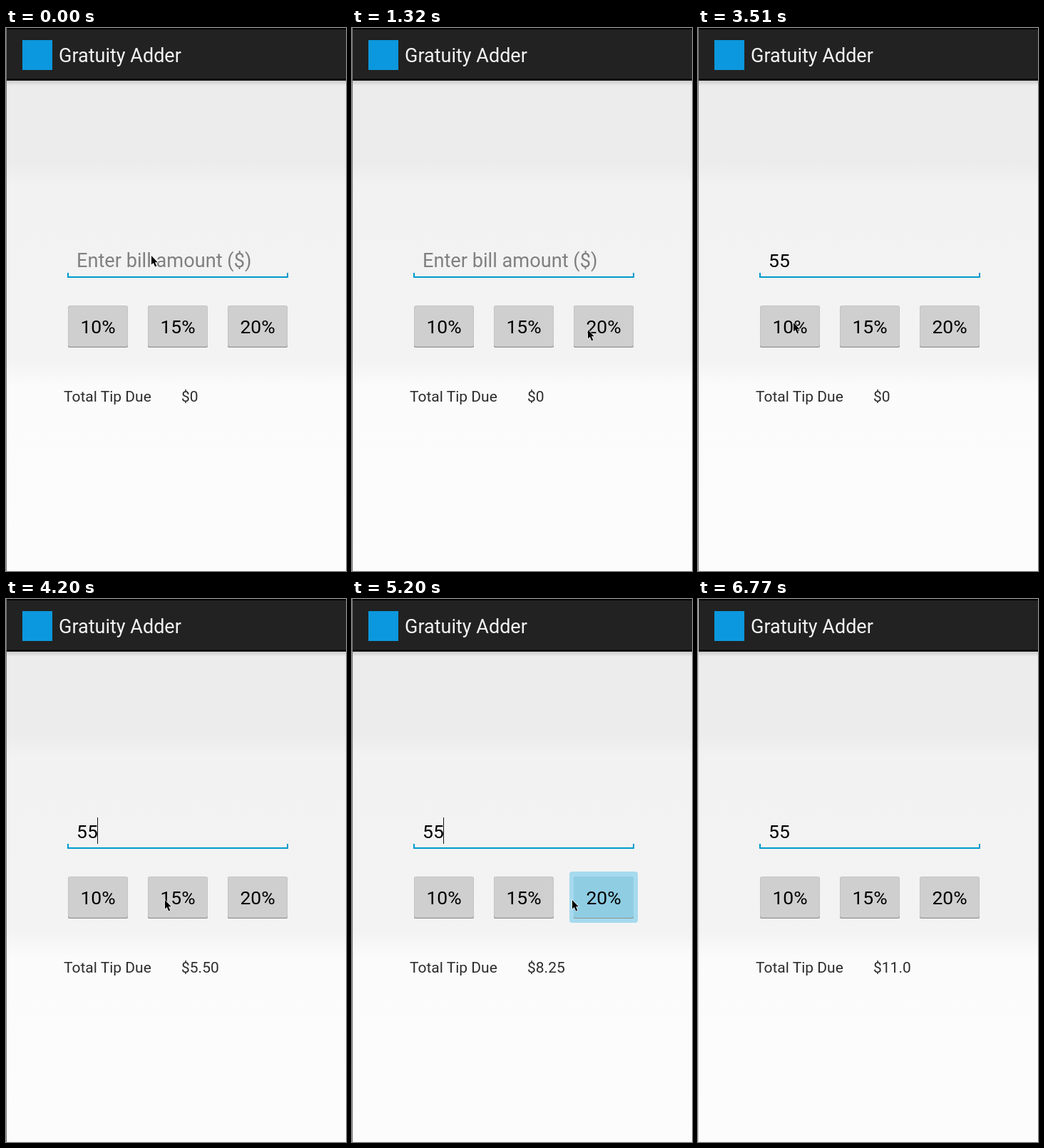
An HTML page that plays this animation: 477x763 px, repeating every 6790 ms.

```html
<!DOCTYPE html>
<html lang="en">
<head>
<meta charset="utf-8">
<title>Gratuity Adder</title>
<style>
  html, body { margin: 0; width: 100%; height: 100%; overflow: hidden; }
  svg { display: block; width: 477px; height: 763px; font: 27px Roboto, sans-serif; }
  .small { font-size: 21px; fill: #2c2c2c; }
  .hint { font-size: 27.2px; fill: #808080; }
  .value, #buttons { font-size: 26.5px; fill: #000; }
  .glow { fill: #33b5e5; opacity: .4; visibility: hidden; }
  .face { fill: #cfcfcf; stroke: #c4c4c4; }
  .down .glow { visibility: visible; }
  .down .face { fill: #8fcde3; stroke: #8fcde3; }
</style>
</head>
<body>
<svg viewBox="0 0 477 763">
  <defs>
    <linearGradient id="page" gradientUnits="userSpaceOnUse" x1="0" y1="0" x2="0" y2="763">
      <stop offset=".25" stop-color="#ececec"/>
      <stop offset=".29" stop-color="#f2f2f2"/>
      <stop offset=".61" stop-color="#f3f3f3"/>
      <stop offset=".66" stop-color="#fbfbfb"/>
      <stop offset="1" stop-color="#fcfcfc"/>
    </linearGradient>
    <linearGradient id="shade" x2="0" y2="1">
      <stop stop-color="#ccc"/>
      <stop offset="1" stop-color="#ccc" stop-opacity="0"/>
    </linearGradient>
  </defs>
  <rect width="477" height="763" fill="url(#page)"/>
  <rect width="477" height="74" fill="#222"/>
  <path d="M0 1H477" stroke="#000" stroke-width="2"/>
  <path d="M0 72.5H477" stroke="#111" stroke-width="3"/>
  <rect y="74" width="477" height="7" fill="url(#shade)"/>
  <rect x="23" y="17" width="42" height="42" fill="#0c98de"/>
  <text x="74" y="48" fill="#f3f3f3">Gratuity Adder</text>

  <text id="bill" x="99" y="336"></text>
  <path d="M87 344V350H395V344" fill="none" stroke="#09c" stroke-width="2"/>
  <path id="caret" d="M.5 307V344" stroke="#111"/>
  <g id="buttons"></g>

  <text class="small" x="81" y="525">Total Tip Due</text>
  <text class="small" id="tip" x="246" y="525"></text>
  <path id="edge" d="M.5 0V763"/>
  <path id="pointer" d="M0 0V12.5L2.8 10L5.2 15.5L7.3 14.5L5 9.2H8.8Z" stroke="#fff" stroke-width="1.2" paint-order="stroke"/>
</svg>
<script>
const LOOP = 6790, TICK = 130, GLIDE = 2 * TICK, BLINK = 500;
const TYPE_START = 2870, TYPE_GAP = 120, FOCUS = 450;
const rates = [10, 15, 20];
const $ = id => document.getElementById(id);

// Pointer stops: [arrival, x, y].
const stops = [
  [0, 204, 320], [260, 136, 420], [910, 225, 423], [1300, 331, 424], [1690, 174, 340],
  [3510, 134, 414], [4160, 223, 423], [4550, 247, 423], [4810, 309, 423],
  [5720, 330, 423], [5980, 376, 684]
];
// The buttons are tapped left to right, once before and once after typing.
const taps = [450, 1050, 1470, 3930, 4520, 5200].map((time, i) => ({ time, button: i % 3 }));

$("buttons").innerHTML = rates.map((rate, i) => `
  <g transform="translate(${87 + 112 * i} 390)">
    <rect class="glow" x="-6" y="-7" width="96" height="72" rx="4"/>
    <rect y="1" width="84" height="58" rx="2" fill="#8e8e8e"/>
    <rect class="face" x=".5" y=".5" width="83" height="57" rx="2"/>
    <text x="42" y="39" text-anchor="middle">${rate}%</text>
  </g>`).join("");
const buttons = [...$("buttons").children];

// The pointer moves in ticks, gliding to each stop and slowing as it arrives.
function pointerAt(t) {
  const now = Math.floor(t / TICK) * TICK;
  const next = stops.findIndex(stop => stop[0] > now);
  if (next < 0) return stops.at(-1).slice(1);
  const [arrival, ...to] = stops[next];
  const from = stops[next - 1].slice(1);
  const left = Math.min(1, (arrival - now) / GLIDE) ** 2;
  return to.map((v, i) => v + (from[i] - v) * left);
}

function draw(t) {
  $("pointer").setAttribute("transform", `translate(${pointerAt(t)})`);
  $("pointer").style.display = t < 6310 ? "" : "none";

  const typed = "55".slice(0, Math.max(0, Math.floor((t - TYPE_START) / TYPE_GAP) + 1));
  $("bill").textContent = typed || "Enter bill amount ($)";
  $("bill").setAttribute("class", typed ? "value" : "hint");

  // Typing restarts the blink.
  const sinceBlink = t - (typed ? TYPE_START + TYPE_GAP : FOCUS);
  const lit = t >= FOCUS && sinceBlink % (2 * BLINK) < BLINK;
  $("caret").style.display = lit ? "" : "none";
  $("caret").setAttribute("transform", `translate(${Math.round(99 + 14.6 * typed.length)})`);

  const down = taps.find(tap => t >= tap.time && t < tap.time + TICK);
  buttons.forEach((button, i) => button.classList.toggle("down", down?.button === i));

  const last = taps.findLast(tap => tap.time > TYPE_START && t >= tap.time + TICK);
  const due = last ? (typed * rates[last.button] / 100).toFixed(2).slice(0, 4) : "0";
  $("tip").textContent = "$" + due;
  $("edge").setAttribute("stroke", t < 6770 ? "#777" : "#d0d0d0");
}

const start = performance.now();
function tick() {
  draw((performance.now() - start) % LOOP);
  requestAnimationFrame(tick);
}
tick();
</script>
</body>
</html>
```
